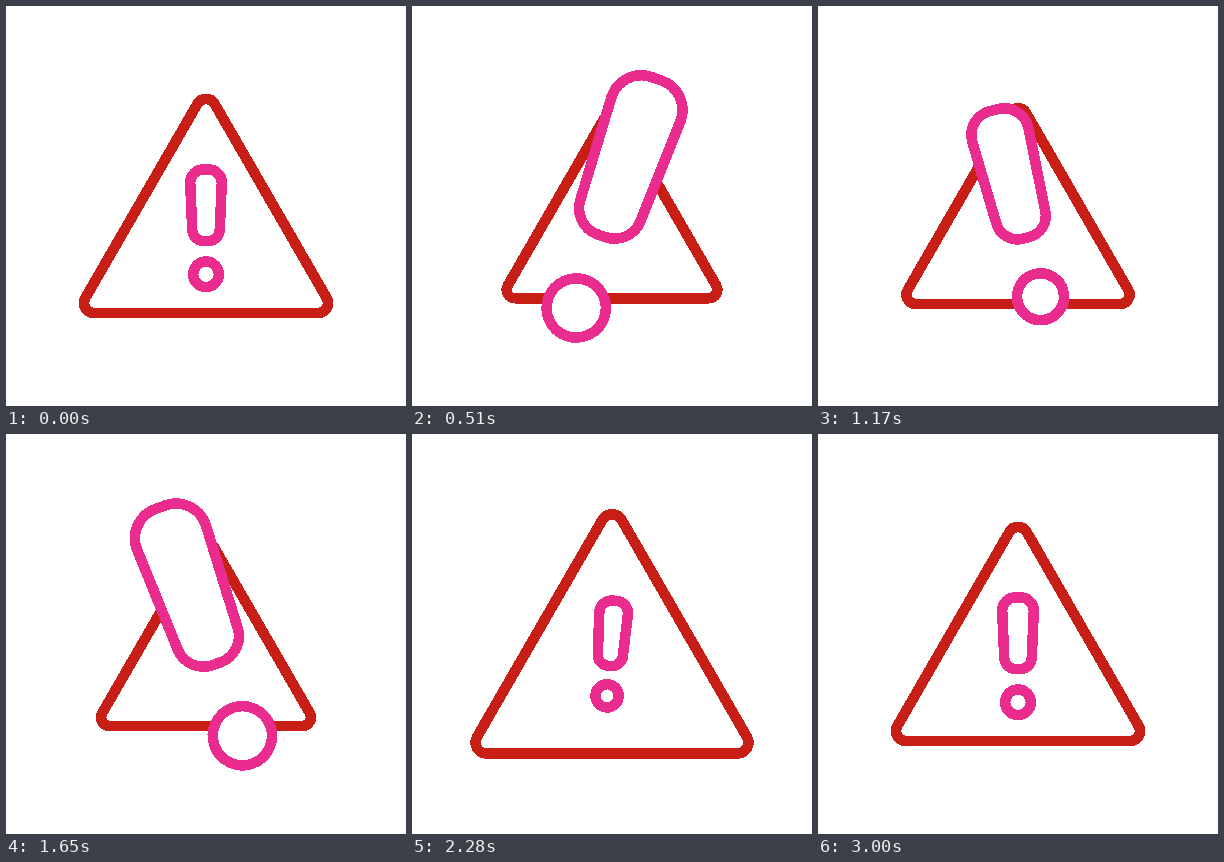
Recreate the animation shown at these times as an HTML page. Size 400x400 px, loop 3030 ms.

```html
<!DOCTYPE html>
<html lang="en">
<head>
<meta charset="utf-8">
<title>Warning sign</title>
<style>
  html, body { margin: 0; height: 100%; overflow: hidden; background: #fff; }
  svg { display: block; width: 400px; height: 400px; shape-rendering: crispEdges; }
  path, circle { fill: #fff; stroke-width: 10.5; vector-effect: non-scaling-stroke; }
</style>
</head>
<body>
<svg viewBox="-200 -200 400 400">
  <path id="sign" stroke="#c71f16" d="M-8.7 -102A10 10 0 0 1 8.7 -102L120.7 92A10 10 0 0 1 112 107H-112A10 10 0 0 1 -120.7 92Z"/>
  <g id="mark" stroke="#eb2c8f">
    <path d="M-15.8 -23.2A13.5 13.5 0 0 1 -2.3 -36.7H2.3A13.5 13.5 0 0 1 15.8 -23.2L13.8 23.2A12 12 0 0 1 1.8 35.2H-1.8A12 12 0 0 1 -13.8 23.2Z"/>
    <circle cy="68.3" r="12.8"/>
  </g>
</svg>
<script>
const LOOP = 3030, STEP = 30;
// Moments of the swing in ms: far right, upright, far left, past rest, at rest
const RIGHT = 450, UPRIGHT = 980, LEFT = 1410, PAST = 2220, REST = 2720;
const sign = document.getElementById('sign');
const mark = document.getElementById('mark');

// Smooth step from 0 to 1 between two moments
function ramp(t, from, to) {
  const x = Math.min(1, Math.max(0, (t - from) / (to - from)));
  return (1 - Math.cos(Math.PI * x)) / 2;
}

// Smooth bump that starts, tops out and ends at three moments
const bump = (t, from, top, to) => ramp(t, from, top) - ramp(t, top, to);

// Swells from 1, eases off while upright, then overshoots on release
function swell(t, release, size, dip, over) {
  return 1 + size * (ramp(t, 0, RIGHT) - ramp(t, release, PAST))
    - dip * bump(t, RIGHT, UPRIGHT, LEFT)
    - over * bump(t, release, PAST, REST);
}

function draw(now) {
  const t = Math.floor(now % LOOP / STEP) * STEP;
  const signScale = swell(t, 1745, -.14, -.092, -.122);
  const markScale = swell(t, 1595, 1.34, .86, .095);
  const angle = 19.7 * (ramp(t, 0, RIGHT) - 2 * ramp(t, RIGHT, LEFT) + ramp(t, 1640, PAST))
    + 4.7 * bump(t, 1640, PAST, REST);
  const lift = 38 * Math.max(0, markScale - 1); // keeps the foot of the bar in place
  sign.setAttribute('transform', `scale(${signScale})`);
  mark.setAttribute('transform', `rotate(${angle}) translate(0 ${-lift}) scale(${markScale})`);
}

const start = performance.now();
function tick() {
  draw(performance.now() - start);
  requestAnimationFrame(tick);
}
tick();
</script>
</body>
</html>
```
